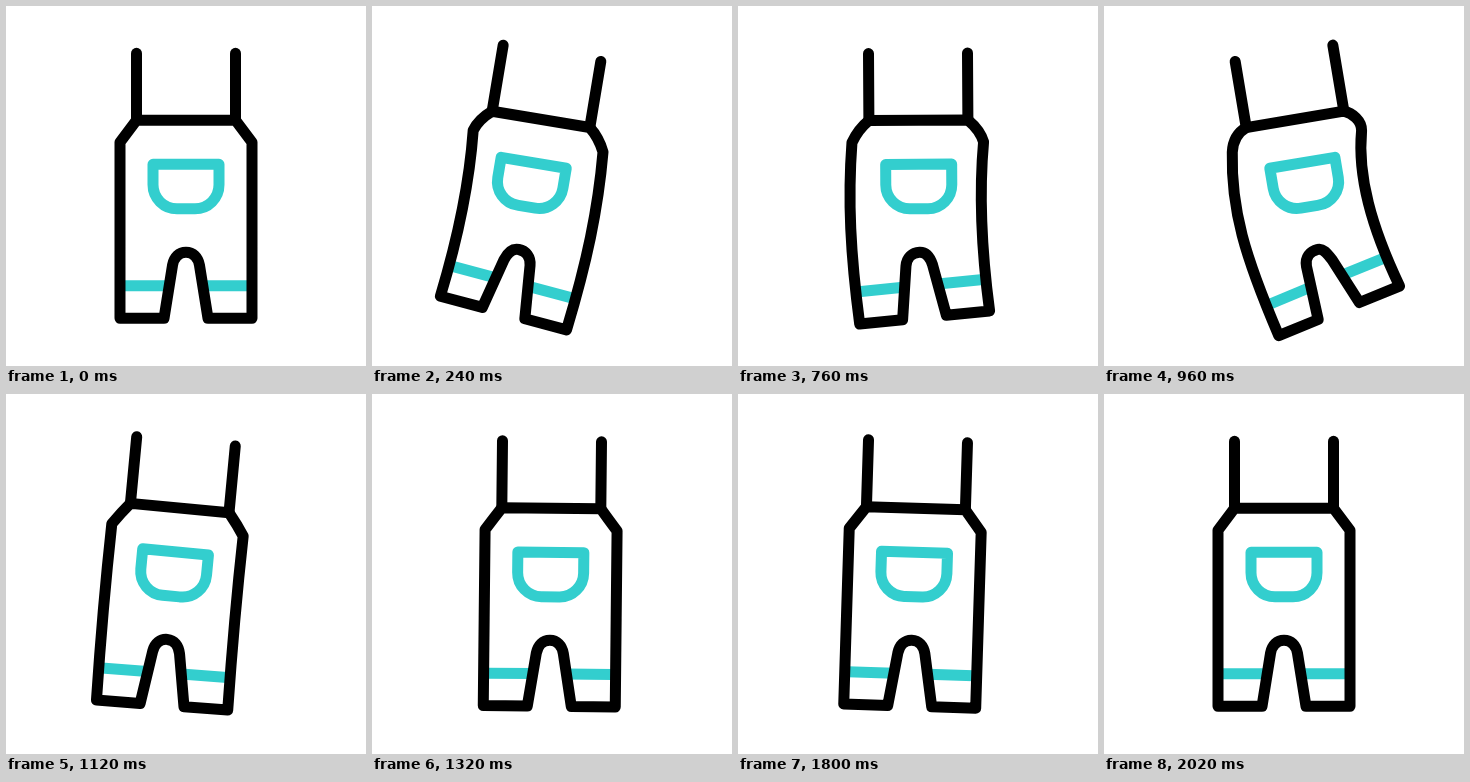
Recreate the animation shown at these times as an HTML page with a canvas. Size 360x360 px, loop 2.4 s.

```html
<!DOCTYPE html>
<html lang="en">
<head>
<meta charset="utf-8">
<title>Swinging dungarees</title>
<style>
html, body { margin: 0; width: 100%; height: 100%; overflow: hidden; background: #fff; }
canvas { display: block; width: 100vmin; height: 100vmin; }
</style>
</head>
<body>
<canvas id="stage"></canvas>
<script>
const SIZE = 360, LOOP = 2400, LINE = 11;
const INK = '#000', TEAL = '#33cece';
const canvas = document.getElementById('stage');
const ctx = canvas.getContext('2d');

// Damped swing: time in ms, angle in degrees, bend of the legs (-1..1).
const KEYS = [
  [0, 0, 0], [568, 24.5, 1], [885, -13.1, -1.1], [1165, 6.7, 0],
  [1450, -4, 0], [1732, 2.1, 0], [2018, 0, 0]
];

const mix = (a, b, k) => a + (b - a) * k;
const ease = k => k * k * (3 - 2 * k);

function pose(t) {
  const i = KEYS.findIndex(key => key[0] > t);
  if (i < 0) return [0, 0];
  const a = KEYS[i - 1], b = KEYS[i];
  const k = ease((t - a[0]) / (b[0] - a[0]));
  return [mix(a[1], b[1], k), mix(a[2], b[2], k)];
}

function stroke(color) {
  ctx.strokeStyle = color;
  ctx.stroke();
}

function segment(x1, y1, x2, y2, color) {
  ctx.beginPath();
  ctx.moveTo(x1, y1);
  ctx.lineTo(x2, y2);
  stroke(color);
}

function stripes(k) {
  ctx.lineCap = 'butt';
  const y = 232.5;
  segment(mix(-63, -65, k), mix(y, 217, k), mix(-17, -21, k), mix(y, 228, k), TEAL);
  segment(mix(17, 15, k), mix(y, 236, k), mix(63, 57, k), mix(y, 247, k), TEAL);
  ctx.lineCap = 'round';
}

// Each point is given straight (x, y) and fully bent (bx, by).
function outline(k) {
  const at = (x, y, bx, by) => [mix(x, bx, k), mix(y, by, k)];
  const line = p => ctx.lineTo(...p);
  const curve = (a, b, c) => ctx.bezierCurveTo(...a, ...b, ...c);

  ctx.beginPath();
  ctx.moveTo(-49.5, 67);
  curve(at(-55, 74.3, -58, 70), at(-60.5, 81.7, -66, 79), at(-66, 89, -63.5, 89));
  curve(at(-66, 147.7, -50.5, 132), at(-66, 206.3, -56.5, 183), at(-66, 265, -76.5, 247));
  line(at(-22, 265, -34.4, 257.5));
  line(at(-13.5, 212, -13, 211));
  curve(at(-12, 204, -9, 204), at(-7, 199, -6, 198.5), at(0, 199, -1, 199));
  curve(at(7, 199, 7, 199.5), at(12, 204, 13.5, 205), at(13.5, 212, 13, 214));
  line(at(22, 265, 9, 268.5));
  line(at(66, 265, 50.3, 279));
  curve(at(66, 206.3, 73, 191.5), at(66, 147.7, 79.5, 145), at(66, 89, 67.5, 89));
  curve(at(60.5, 81.7, 65.5, 78), at(55, 74.3, 59, 70), [49.5, 67]);
  ctx.closePath();
  stroke(INK);
}

function pocket() {
  ctx.beginPath();
  ctx.moveTo(-33, 111);
  ctx.lineTo(33, 111);
  ctx.lineTo(33, 131);
  ctx.arcTo(33, 155.5, 8, 155.5, 24);
  ctx.lineTo(-8, 155.5);
  ctx.arcTo(-33, 155.5, -33, 131, 24);
  ctx.closePath();
  stroke(TEAL);
}

function draw(t) {
  const [angle, bend] = pose(t);
  const side = Math.min(innerWidth, innerHeight);
  const px = Math.round(side * devicePixelRatio) || SIZE;
  if (canvas.width !== px) canvas.width = canvas.height = px;
  ctx.setTransform(px / SIZE, 0, 0, px / SIZE, 0, 0);
  ctx.fillStyle = '#fff';
  ctx.fillRect(0, 0, SIZE, SIZE);

  ctx.translate(180, 47.3);
  ctx.rotate(angle * Math.PI / 180);
  if (bend < 0) ctx.scale(-1, 1);
  ctx.lineWidth = LINE;
  ctx.lineJoin = ctx.lineCap = 'round';

  stripes(Math.abs(bend));
  pocket();
  outline(Math.abs(bend));
  for (const x of [-49.5, 49.5]) segment(x, 0, x, 67, INK);
}

const start = performance.now();
function tick() {
  draw((performance.now() - start) % LOOP);
  requestAnimationFrame(tick);
}
tick();
</script>
</body>
</html>
```
